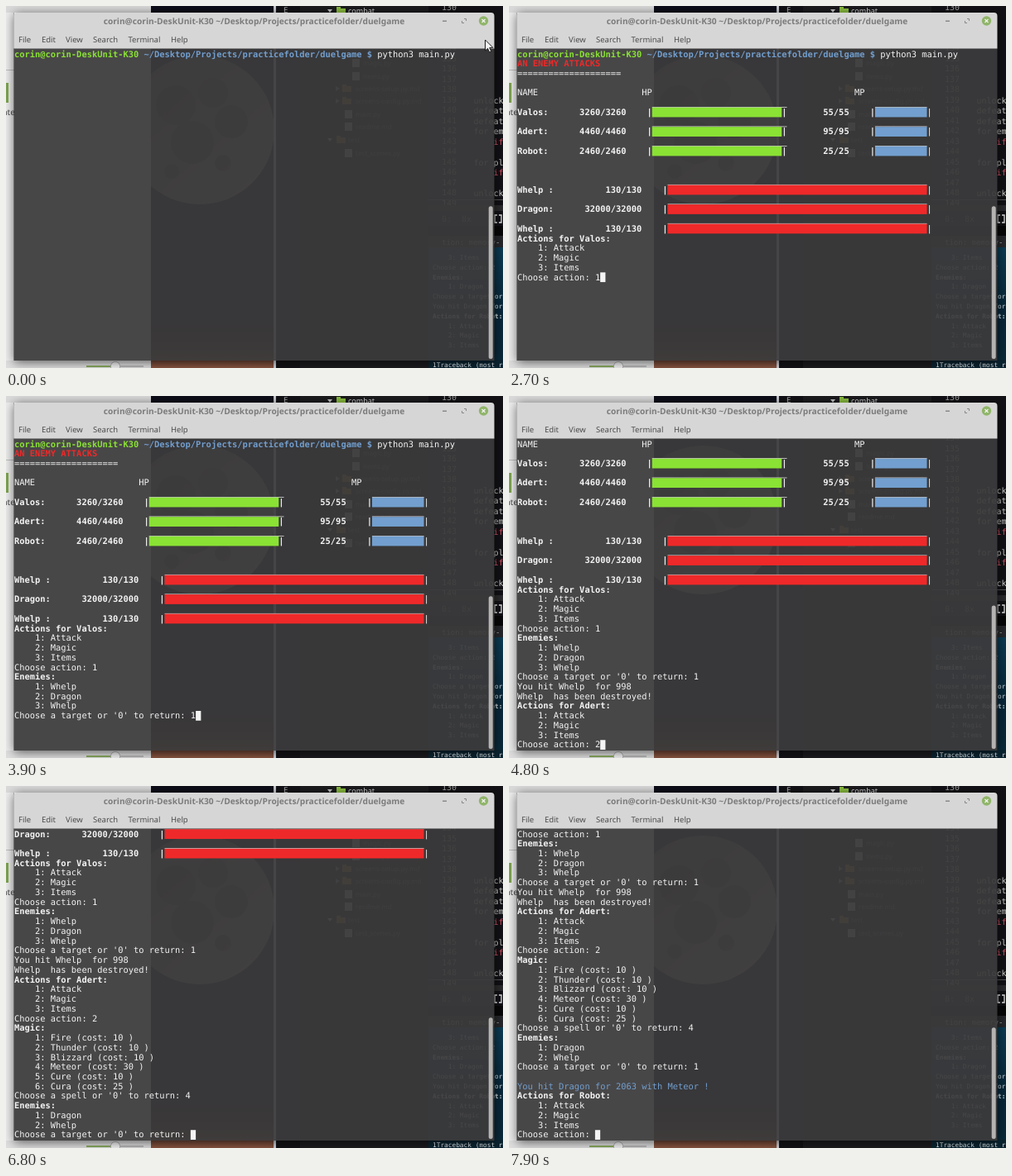
An HTML page with a canvas that plays this animation: 600x438 px, repeating every 8000 ms.

```html
<!DOCTYPE html>
<html lang="en">
<head>
<meta charset="utf-8">
<title>Terminal battle</title>
<style>
html, body { margin: 0; width: 100%; height: 100%; overflow: hidden; background: #111; }
canvas { display: block; width: 600px; height: 438px; }
</style>
</head>
<body>
<canvas id="stage" width="600" height="438"></canvas>
<script>
const W = 600, H = 438, LOOP = 8000;
const CW = 6.26, RH = 11.74, LEFT = 10, TOP = 52.3, ROWS = 32;
const WIN = { x: 9.5, y: 8, w: 580, h: 421 };
const WHITE = '#f4f4f4', GREEN = '#8ae234', BLUE = '#729fcf', RED = '#ef2929';
const MONO = '"DejaVu Sans Mono", monospace', SANS = '"Noto Sans", sans-serif';
const ctx = document.getElementById('stage').getContext('2d');

// ---- terminal content ----
const USER = 'corin@corin-DeskUnit-K30';
const PATH = '~/Desktop/Projects/practicefolder/duelgame';
const row = (...segs) => ({ segs, bars: [] });
const line = (text, color = WHITE, bold = false) => row([0, text, color, bold]);
const head = text => line(text, WHITE, true);
const blank = () => row();
const list = (...items) => items.map((s, i) => line(`    ${i + 1}: ${s}`));
const menu = name => [head(`Actions for ${name}:`), ...list('Attack', 'Magic', 'Items')];

function hero(name, hp, mp) {
  const r = row([0, name + ':', WHITE, true], [12, hp, WHITE, true], [25, '|', WHITE, true],
    [51, '|', WHITE, true], [59, mp, WHITE, true], [68, '|', WHITE, true], [79, '|', WHITE, false]);
  r.bars = [[26, 25, GREEN, 26], [69, 10, BLUE, 10]];
  return r;
}
function foe(name, hp) {
  const r = row([0, name + ':', WHITE, true], [24 - hp.length, hp, WHITE, true],
    [28, '|', WHITE, true], [79, '|', WHITE, false]);
  r.bars = [[29, 50, RED, 50]];
  return r;
}

const lines = [
  row([0, USER, GREEN, true], [25, PATH + ' $', BLUE, true], [70, 'python3 main.py', WHITE]),
  line('AN ENEMY ATTACKS', RED, true),
  line('='.repeat(20)),
  blank(),
  row([0, 'NAME', WHITE], [24, 'HP', WHITE], [65, 'MP', WHITE]), blank(),
  hero('Valos', '3260/3260', '55/55'), blank(),
  hero('Adert', '4460/4460', '95/95'), blank(),
  hero('Robot', '2460/2460', '25/25'), blank(), blank(), blank(),
  foe('Whelp ', '130/130'), blank(),
  foe('Dragon', '32000/32000'), blank(),
  foe('Whelp ', '130/130'),
  ...menu('Valos'),
  line('Choose action: 1'),
  head('Enemies:'), ...list('Whelp', 'Dragon', 'Whelp'),
  line("Choose a target or '0' to return: 1"),
  line('You hit Whelp  for 998'),
  line('Whelp  has been destroyed!'),
  ...menu('Adert'),
  line('Choose action: 2'),
  head('Magic:'),
  ...list('Fire (cost: 10 )', 'Thunder (cost: 10 )', 'Blizzard (cost: 10 )',
    'Meteor (cost: 30 )', 'Cure (cost: 10 )', 'Cura (cost: 25 )'),
  line("Choose a spell or '0' to return: 4"),
  head('Enemies:'), ...list('Dragon', 'Whelp'),
  line("Choose a target or '0' to return: 1"),
  blank(),
  line('You hit Dragon for 2063 with Meteor !', BLUE),
  ...menu('Robot'),
  line('Choose action: ')
];

// time, last line, characters shown on it, cursor visible
const steps = [
  [0, 0, 85, 0], [200, 0, 85, 1], [800, 0, 85, 0],
  [1100, 23, 15, 1], [1700, 23, 15, 0], [2300, 23, 15, 1], [2700, 23, 16, 1],
  [2800, 28, 34, 1], [3300, 28, 34, 0], [3700, 28, 35, 1],
  [4100, 35, 15, 1], [4700, 35, 16, 1],
  [4900, 43, 33, 1], [5500, 43, 33, 0], [6100, 43, 33, 1], [6700, 43, 34, 1],
  [6800, 47, 34, 1], [7400, 47, 34, 0], [7700, 47, 35, 1],
  [7800, 54, 15, 1]
];

// ---- drawing helpers ----
function rect(c, x, y, w, h, fill) {
  c.fillStyle = fill;
  c.fillRect(x, y, w, h);
}
function text(c, s, x, y, font, fill, align = 'left') {
  c.font = font;
  c.fillStyle = fill;
  c.textAlign = align;
  c.fillText(s, x, y);
}
function disc(c, x, y, r, fill) {
  c.fillStyle = fill;
  c.beginPath();
  c.arc(x, y, r, 0, Math.PI * 2);
  c.fill();
}
function poly(c, fill, ...pts) {
  c.fillStyle = fill;
  c.beginPath();
  pts.forEach(([x, y]) => c.lineTo(x, y));
  c.closePath();
  c.fill();
}
function stroke(c, color, width, ...pts) {
  c.strokeStyle = color;
  c.lineWidth = width;
  c.beginPath();
  pts.forEach(([x, y]) => c.lineTo(x, y));
  c.stroke();
}
function fade(c, x0, y0, x1, y1, ...colors) {
  const g = c.createLinearGradient(x0, y0, x1, y1);
  colors.forEach((col, i) => g.addColorStop(i / (colors.length - 1), col));
  return g;
}

// ---- static desktop behind the window ----
function drawFiles(c) {
  rect(c, 0, 0, 175, H, '#ececec');
  rect(c, 0, 0, 175, 8, '#dadada');
  rect(c, 0, 77, 10, 1, '#bdbdbd');
  rect(c, 0, 93, 3, 24, '#7fa650');
  text(c, 'ate', -4, 132, '10px ' + SANS, '#444');
  rect(c, 0, 429, 175, 9, '#dedede');
  rect(c, 97, 435, 32, 2, '#86a95c');
  rect(c, 138, 435, 28, 2, '#b5b5b5');
  disc(c, 132, 436, 6, '#a9a9a9');
  disc(c, 132, 436, 5.2, '#f3f3f3');
}

function drawSpace(c) {
  rect(c, 175, 0, 150, H, '#0c0d18');
  c.save();
  c.beginPath();
  c.rect(175, 0, 149, H);
  c.clip();
  disc(c, 234, 150, 90, fade(c, 180, 80, 300, 220, '#5c5b5a', '#8a8886'));
  [[205, 120, 24], [250, 105, 18], [225, 165, 26], [272, 140, 20], [262, 190, 10], [200, 200, 9]]
    .forEach(([x, y, r]) => disc(c, x, y, r, 'rgba(40,40,42,.4)'));
  c.restore();
  rect(c, 175, 380, 150, 58, fade(c, 0, 380, 0, 438, '#0c0d18', '#3a2620', '#8a5540'));
  rect(c, 323, 0, 3, H, '#c9ccd4');
}

function drawEditor(c) {
  rect(c, 326, 0, 274, H, '#121216');
  rect(c, 355, 0, 155, H, '#1b1b1e');
  text(c, 'E', 335, 8, '9px ' + MONO, '#b8b8b8');

  const label = (s, x, y) => text(c, s, x, y, '8px ' + SANS, '#6c6c6c');
  const folder = (x, y, col) => {
    rect(c, x, y - 3, 11, 7, col);
    rect(c, x, y - 5, 5, 2, col);
  };
  const open = (x, y) => poly(c, '#c4c4c4', [x - 11, y - 2], [x - 5, y - 2], [x - 8, y + 2]);
  const shut = (x, y) => poly(c, '#8a8a8a', [x - 8, y - 3], [x - 3, y], [x - 8, y + 3]);
  const file = (x, y, name) => {
    rect(c, x, y - 5, 9, 10, '#a8a8a8');
    label(name, x + 13, y + 3);
  };
  folder(399, 6, '#8bbf3f');
  open(399, 6);
  text(c, 'combat', 413, 9, '9px ' + SANS, '#dcdcdc');
  file(418, 69, 'magic.py');
  file(418, 85, 'items.py');
  for (const [y, name] of [[100, 'screens-setup.py.md'], [115, 'screens-config.py.md']]) {
    folder(406, y, '#8f6c30');
    shut(406, y);
    label(name, 422, y + 3);
  }
  file(409, 131, 'main.py');
  file(409, 146, 'readme.md');
  folder(399, 162, '#8f6c30');
  open(399, 162);
  label('test', 413, 165);
  file(409, 178, 'test_scenes.py');

  for (let n = 130; n < 150; n++)
    text(c, n, 526, 4.5 + (n - 130) * 12.48, '10px ' + MONO, '#a2a2a2');
  const code = [[113, 'unlock'], [125, 'defeat'], [138, 'defeat'], [150, 'for em'],
    [163, '    if'], [188, 'for pl'], [200, '    if'], [225, 'unlock']];
  for (const [y, s] of code)
    text(c, s, 564.5, y + 4.5, '10px ' + MONO, s.trim() === 'if' ? '#e0566a' : '#d4d4d0');

  rect(c, 510, 234, 90, 1, '#555');
  rect(c, 510, 241, 90, 7, '#2b2b2d');
  rect(c, 510, 266, 90, 12, '#070708');
  text(c, '0:  8x', 526, 261, '10px ' + MONO, '#888');
  stroke(c, '#e8e8e8', 1.3, [593, 253], [590, 253], [590, 262], [593, 262]);
  stroke(c, '#e8e8e8', 1.3, [595, 253], [598, 253], [598, 262], [595, 262]);

  rect(c, 510, 278, 90, 14, '#26282b');
  text(c, 'tion: memory-', 526, 289, '9px ' + MONO, '#b4b4b4');
  rect(c, 510, 292, 90, 146, fade(c, 0, 292, 0, 438, '#0b3c54', '#08283a', '#0a2a3a'));
  const log = ['    3: Items', 'Choose action: 2', 'Enemies:', '    1: Dragon', 'Choose a target or',
    'You hit Dragon for', 'Actions for Robot:', '    1: Attack', '    2: Magic', '    3: Items'];
  log.forEach((s, i) => text(c, s, 515, 307 + i * 11.8,
    (/^[AE]/.test(s) ? 'bold ' : '') + '7.8px ' + MONO, '#dde6ea'));
  rect(c, 510, 428, 90, 10, '#0a2431');
  text(c, '1Traceback (most r', 515, 437, '7.8px ' + MONO, '#e6ecef');
}

function drawWindow(c) {
  const { x, y, w, h } = WIN;
  c.save();
  c.beginPath();
  c.rect(0, 0, W, H);
  c.rect(x, y, w, h);
  c.clip('evenodd');
  c.shadowColor = 'rgba(0,0,0,.6)';
  c.shadowBlur = 12;
  c.shadowOffsetY = 2;
  rect(c, x, y, w, h, '#000');
  c.restore();

  rect(c, x, 51, w, y + h - 51, 'rgba(60,59,60,.93)');
  c.fillStyle = '#d6d6d6';
  c.beginPath();
  c.roundRect(x, y, w, 51.5 - y, [4, 4, 0, 0]);
  c.fill();
  text(c, `${USER} ${PATH}`, 299.5, 22.2, 'bold 10.2px ' + SANS, '#7c7c7c', 'center');
  const items = { File: 15, Edit: 43, View: 72, Search: 105, Terminal: 147.5, Help: 199 };
  for (const name in items) text(c, name, items[name], 43.7, '9.5px ' + SANS, '#4c4c4c');

  rect(c, 527, 17.6, 5, 1.2, '#777');
  stroke(c, '#888', 1, [553, 15.5], [555.5, 15.5], [555.5, 18]);
  stroke(c, '#888', 1, [550.5, 18], [550.5, 20.5], [553, 20.5]);
  disc(c, 576.5, 18, 5.7, '#8fb568');
  stroke(c, '#f4f4f4', 1.3, [574.5, 16], [578.5, 20]);
  stroke(c, '#f4f4f4', 1.3, [578.5, 16], [574.5, 20]);
}

const desktop = document.createElement('canvas');
desktop.width = W;
desktop.height = H;
const back = desktop.getContext('2d');
back.textRendering = 'geometricPrecision';
drawFiles(back);
drawSpace(back);
drawEditor(back);
drawWindow(back);

// ---- live parts ----
function drawRow(r, top, limit) {
  for (const [col, n, color, rule] of r.bars) {
    const x = LEFT + col * CW;
    rect(ctx, x, top - 0.7, rule * CW, 0.8, '#dcdcdc');
    rect(ctx, x, top, n * CW, RH, color);
  }
  for (const [col, s, color, bold] of r.segs) {
    ctx.font = (bold ? 'bold ' : '') + '10.4px ' + MONO;
    ctx.fillStyle = color;
    for (let i = 0; i < s.length && col + i < limit; i++)
      if (s[i] !== ' ') ctx.fillText(s[i], LEFT + (col + i) * CW, top + 9.2);
  }
}

function drawPointer(x, y) {
  const pts = [[0, 0], [0, 13], [3, 10.3], [5, 14.8], [7.2, 13.8], [5.2, 9.5], [9.3, 9.3]]
    .map(([px, py]) => [x + px, y + py]);
  poly(ctx, '#f6f6f6', ...pts);
  stroke(ctx, '#1c1c1c', 1, ...pts, pts[0]);
}

function draw(t) {
  const [, last, chars, cursor] = steps.findLast(s => s[0] <= t);
  const offset = Math.max(0, last - ROWS + 1);
  ctx.textRendering = 'geometricPrecision';
  ctx.textAlign = 'left';
  ctx.drawImage(desktop, 0, 0);

  ctx.save();
  ctx.beginPath();
  ctx.rect(WIN.x, 52, WIN.w, WIN.y + WIN.h - 52);
  ctx.clip();
  for (let i = offset; i <= last; i++)
    drawRow(lines[i], TOP + (i - offset) * RH, i === last ? chars : Infinity);
  if (cursor) rect(ctx, LEFT + chars * CW, TOP + (last - offset) * RH, CW, RH, WHITE);
  ctx.restore();

  const thumb = 11450 / (62 + offset);
  ctx.fillStyle = '#b4b3b2';
  ctx.beginPath();
  ctx.roundRect(582.7, 427 - thumb, 5, thumb, 2.5);
  ctx.fill();

  if (t < 100) drawPointer(578.5, 41);
}

const start = performance.now();
function tick() {
  draw((performance.now() - start) % LOOP);
  requestAnimationFrame(tick);
}
tick();
</script>
</body>
</html>
```
